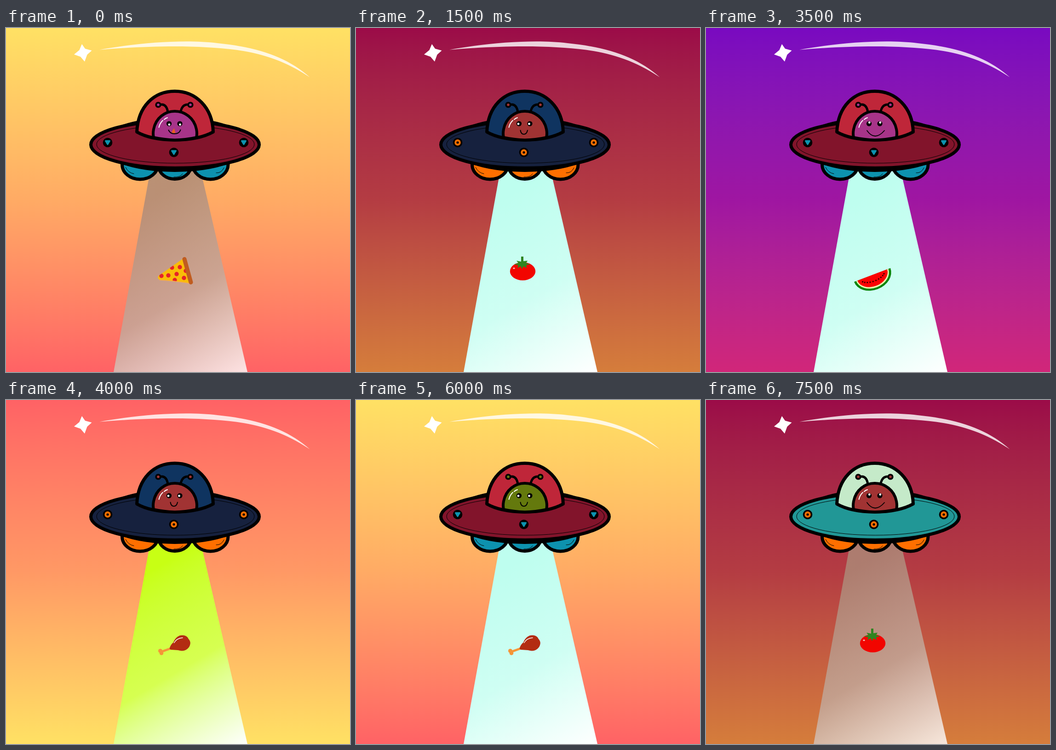
These frames come from a looping animation (748x748 px, 8 s). An HTML page:

```html
<!DOCTYPE html>
<html lang="en">
<head>
<meta charset="utf-8">
<title>Hungry saucer</title>
<style>
html, body { margin: 0; width: 100%; height: 100%; overflow: hidden; }
svg { display: block; width: 100vw; height: 100vh; }
</style>
</head>
<body>
<svg id="stage" viewBox="0 0 748 748"></svg>
<script>
const STEP = 500;

const skies = [
  ['#ffe164', '#ff6265'],
  ['#ff6265', '#ffe164'],
  ['#7909c0', '#d12679'],
  ['#9b0b48', '#d57d3b']
];

const TEAL = '#0d92af', ORANGE = '#ff6f00';
const ships = [
  { body: '#82142b', dome: '#bf2639', lamp: TEAL },
  { body: '#c9d317', dome: '#e2e87a', lamp: ORANGE },
  { body: '#16213e', dome: '#0f3460', lamp: ORANGE },
  { body: '#219796', dome: '#c5eac9', lamp: ORANGE },
  { body: '#87431d', dome: '#c87941', lamp: TEAL }
];

const skins = ['#a73489', '#7fa021', '#a13333', '#64790d'];

const beams = [
  { color: '#ac8a78', alpha: .83 },
  { color: '#c8ff14', alpha: 1 },
  { color: '#befeef', alpha: 1 }
];

const circle = (x, y, r, fill, more = '') =>
  `<circle cx="${x}" cy="${y}" r="${r}" fill="${fill}" ${more}/>`;
const ellipse = (x, y, rx, ry, fill, more = '') =>
  `<ellipse cx="${x}" cy="${y}" rx="${rx}" ry="${ry}" fill="${fill}" ${more}/>`;
const shape = (d, fill, more = '') => `<path d="${d}" fill="${fill}" ${more}/>`;
const line = (d, width, color = '#000') =>
  `<path d="${d}" fill="none" stroke="${color}" stroke-width="${width}" stroke-linecap="round"/>`;
const ink = width => `stroke="#000" stroke-width="${width}" stroke-linejoin="round"`;

// Dark eyes with a glint offset by (dx, dy)
const eyes = (dx, dy) => [354.5, 378].map(x =>
  circle(x, 208, 5.6, '#000') + circle(x + dx, 208 + dy, 2.4, '#fff')).join('');
const wideEyes = [354.5, 378].map(x =>
  circle(x, 208, 6, '#fff3e4') + circle(x, 208, 1.6, '#000')).join('');

const faces = [
  eyes(.5, 2) + shape('M365.5 218L360 226.5 363 229 368.5 228Z', '#e8601f') +
    line('M353.5 222Q357 230 366 230Q377 230 379.5 221.5', 2),
  wideEyes + line('M351 223Q352 231 358 231Q364.5 231 365.5 223Q367 231 373 231Q380 231 381 223', 2.2),
  eyes(-1.5, .5) + line('M357.5 222.5Q359 231 365 231Q371 231 373 222.5', 2),
  eyes(.8, -2.5) + line('M350 223Q367 247 388 223', 1.8)
];

function pizza() {
  const slices = [[361, 521], [378, 520], [391, 528], [338, 539],
    [353, 538], [371, 535], [387, 543.5], [367, 548]];
  const wedge = 'M385 501.5L332 538.5Q328 544 334 547.5L400 555Z';
  return `<clipPath id="wedge">${shape(wedge, '#000')}</clipPath>` +
    shape(wedge, '#f9bc08') +
    `<g clip-path="url(#wedge)">${slices.map(([x, y]) => circle(x, y, 4.7, '#e62328')).join('')}</g>` +
    line('M334 548Q360 549 399 555', 1.6, '#f8a94a') +
    line('M388 502.5L402 553', 9, '#c05c20');
}

function drumstick() {
  return line('M339 547L357 540.5', 5, '#f59638') +
    circle(335.5, 545.5, 4.5, '#f59638') + circle(338, 550.5, 4.3, '#f59638') +
    shape('M356 539Q358 532 364 527C368 517 375 511 384 511.5C391 512 395 515 396.5 519' +
      'Q402 525 400.5 531Q399 539 391 543.5Q384 547 374 544L359 543Q355 542 356 539Z', '#b32c12') +
    line('M365.5 528Q371 518 384 517', 1.4, '#fff');
}

function melon() {
  const half = (rx, ry, fill) => shape(`M${-rx} 0A${rx} ${ry} 0 0 0 ${rx} 0Z`, fill);
  let seeds = '';
  for (let i = 0; i < 10; i++) {
    const a = (28 + i * 13.8) * Math.PI / 180;
    seeds += circle(28 * Math.cos(a), 14 * Math.sin(a), 1.5, '#250000');
  }
  return `<g transform="translate(361.5 537) rotate(-20.8)">` +
    half(42.3, 33, '#078407') + half(37.5, 28.5, '#e6f2ac') + half(34.5, 25, '#fb0303') + seeds + '</g>';
}

function tomato() {
  return ellipse(362.5, 529, 27.7, 19.7, '#f20500') +
    ellipse(343.5, 522.5, 2.2, 1.8, '#f6b0a6') +
    shape('M359 497H364V507L373 506 370 511 378 514 370 516 371 522 364 518 361 524 358 518' +
      ' 351 522 353 516 344 514 353 511 349 506 359 508Z', '#2f8420');
}

const foods = [pizza(), drumstick(), melon(), tomato()];

function lamps(color) {
  return [[291.5, 297, 39, 32], [444.5, 297, 38.5, 32], [367, 300, 35, 28.5]]
    .map(e => ellipse(...e, color, ink(7))).join('') +
    line('M260 303Q266 315 278 317M365 324Q379 325 384 317M457 315Q468 316 474 304', 1) +
    ellipse(367, 253.5, 165, 59.5, '#000');
}

function buttons(color) {
  return [[221, 249], [517, 249], [365, 270.5]].map(([x, y]) =>
    circle(x, y, 10.3, '#000') + (color === TEAL
      ? shape(`M${x - 4.5} ${y - 3.5}H${x + 4.5}L${x} ${y + 4}Z`, color,
        `stroke="${color}" stroke-width="3" stroke-linejoin="round"`)
      : circle(x, y, 6.7, color) + circle(x, y, 2.6, '#000'))).join('');
}

function alien(skin, face) {
  return line('M337 166.5Q349 165 352 183M395 166.5Q383 166 379.5 183', 5) +
    circle(331, 167, 4.7, skin, ink(3.8)) + circle(401, 167, 4.7, skin, ink(3.8)) +
    shape('M321 238Q319 230 321 220C326 195 346 181 367 181S409 195 414 220' +
      'Q416 230 414 238Q390 243.5 367 243.5Q344 243 321 238Z', skin, ink(6)) +
    line('M332.5 216Q335 206 341 201M344 199Q347 196 351 195', 2, '#fff') + face;
}

function ship({ body, dome, lamp }, skin, face) {
  return lamps(lamp) +
    ellipse(367.5, 253.5, 183, 51, body, ink(7)) +
    ellipse(368.5, 253, 171.5, 41, 'none', ink(1)) +
    buttons(lamp) +
    shape('M284.5 226C287 170 322 137.5 367 137.5C412 137.5 449 172 450.5 226' +
      'Q420 243 367 243.5Q314 243 284.5 226Z', dome, ink(7)) +
    alien(skin, face);
}

const comet = shape('M165 35L172 45 186.5 49 176.5 58 171 73 162 62.5 148 57.5 159.5 48Z', '#fff') +
  shape('M203 47.5C290 31.5 390 24.5 460 33C550 42 612 64 660.5 107C605 70 555 55 500 47.5' +
    'C420 37.5 320 37.5 203 47.5Z', '#fff', 'opacity=".81"');

// The halfway colour keeps the given share of the first one
const gradient = (id, from, to, share, axis) =>
  `<linearGradient id="${id}" gradientUnits="userSpaceOnUse" ${axis}>` +
  `<stop stop-color="${from}"/>` +
  `<stop offset=".5" style="stop-color:color-mix(in srgb, ${from} ${share}%, ${to})"/>` +
  `<stop offset="1" stop-color="${to}"/></linearGradient>`;

// Digits: sky, ship, skin, face, beam, food
const scenes = ('000000 233312 101111 322223 313202 010020 242111 200322 ' +
  '122211 134103 232022 110310 003221 243300 121012 332303').split(' ');

function scene(code) {
  const [sky, craft, skin, face, beam, food] = [...code].map(Number);
  const { color, alpha } = beams[beam];
  return gradient('sky', ...skies[sky], 57, 'x1="0" y1="0" x2="0" y2="748"') +
    gradient('ray', color, '#fff', 74, 'x1="229" y1="423" x2="450" y2="797"') +
    '<rect width="748" height="748" fill="url(#sky)"/>' + comet +
    shape('M315.5 300H421L525 748H234Z', 'url(#ray)', `opacity="${alpha}"`) +
    foods[food] + ship(ships[craft], skins[skin], faces[face]);
}

const stage = document.getElementById('stage');
const start = performance.now();
let shown = -1;

function draw() {
  const index = Math.floor((performance.now() - start) / STEP) % scenes.length;
  if (index !== shown) {
    shown = index;
    stage.innerHTML = scene(scenes[index]);
  }
  requestAnimationFrame(draw);
}
draw();
</script>
</body>
</html>
```
